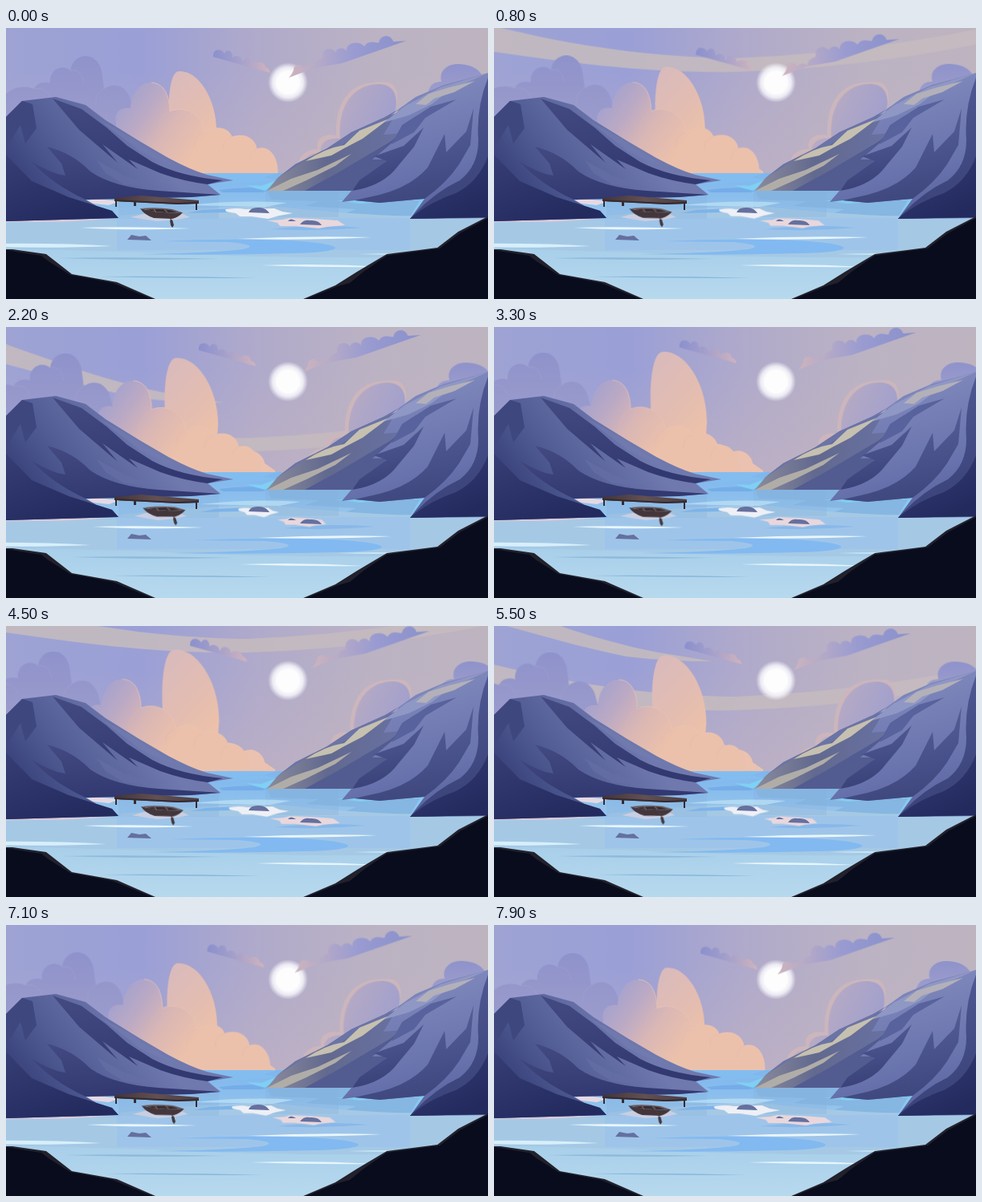
Write an HTML page that moves like this. It is 600 by 338 pixels and loops after 8000 ms.

```html
<!DOCTYPE html>
<html lang="en">
<head>
<meta charset="utf-8">
<title>Lake at dusk</title>
<style>
html,body{margin:0;width:100%;height:100%;overflow:hidden;background:#a5a6d5}
svg{display:block;width:100vw;height:100vh}
@keyframes drift{
  from{transform:none}
  to{transform:translate(var(--x,0px),var(--y,0px)) rotate(var(--r,0deg)) scale(var(--s,1),var(--v,1))}
}
@keyframes fall{from{transform:translateY(-106px)}to{transform:translateY(182px)}}
.cloud{animation:drift 4s linear infinite alternate}
.wave{animation:drift 2s linear infinite alternate}
.wisps{animation:fall 4s linear infinite}
.violet{--x:-46px;--y:-4px}
.tall{--s:1.22;--v:1.22;transform-origin:245px 181px}
.front{--x:-41px;--y:-2px}
.wingL{--x:-33px;--y:-13px}
.wingR{--x:33px;--y:-11px}
.peachR{--x:20px;--y:-1px}
.violetR{--x:18px;--y:-1px}
.tongue{--x:40px;--s:1.1;transform-origin:165px 274px}
.floeA{--s:.56;--v:.9;transform-origin:314px 230px}
.floeB{--s:.58;--v:.9;--x:-6px;transform-origin:374px 243px}
.boat{--x:4px;--y:-1px;--r:-3deg;transform-origin:194px 233px}
.foam{--s:.86;transform-origin:194px 237px}
.left{--x:-30px}
.right{--x:28px}
.small{--x:18px}
</style>
</head>
<body>
<svg viewBox="0 0 600 338" preserveAspectRatio="none">
<defs>
  <linearGradient id="sky"><stop offset="0" stop-color="#9ea3d4"/><stop offset=".28" stop-color="#9a9fd6"/><stop offset=".52" stop-color="#b0aacb"/><stop offset=".76" stop-color="#bbb2c3"/><stop offset="1" stop-color="#beb4c0"/></linearGradient>
  <linearGradient id="dusk" x2="0" y2="1"><stop offset=".3" stop-color="#c8b5bd" stop-opacity="0"/><stop offset="1" stop-color="#c8b5bd" stop-opacity=".4"/></linearGradient>
  <radialGradient id="sun"><stop offset=".55" stop-color="#fdfdfe"/><stop offset=".76" stop-color="#f8f8fc" stop-opacity=".82"/><stop offset="1" stop-color="#f8f8fc" stop-opacity="0"/></radialGradient>
  <linearGradient id="violet" x2="0" y2="1"><stop offset="0" stop-color="#8f93cb"/><stop offset="1" stop-color="#a5a2cd"/></linearGradient>
  <linearGradient id="tall" x2=".5" y2="1"><stop offset="0" stop-color="#d8babe"/><stop offset=".55" stop-color="#e3bdb1"/><stop offset="1" stop-color="#f0c3a8"/></linearGradient>
  <linearGradient id="front" gradientUnits="userSpaceOnUse" x1="150" y1="85" x2="240" y2="150"><stop offset="0" stop-color="#a5a2ce"/><stop offset=".3" stop-color="#bcaac4"/><stop offset=".6" stop-color="#dab7b5"/><stop offset="1" stop-color="#ecc1ab"/></linearGradient>
  <linearGradient id="peach" x2="1" y2=".4"><stop offset="0" stop-color="#cbb3bd"/><stop offset=".5" stop-color="#b3a9c6"/><stop offset="1" stop-color="#a09fcd"/></linearGradient>
  <linearGradient id="wingL"><stop offset="0" stop-color="#8b90cd"/><stop offset=".5" stop-color="#a7a1cb"/><stop offset="1" stop-color="#d0b3bd"/></linearGradient>
  <linearGradient id="wingR"><stop offset="0" stop-color="#cdb4bd"/><stop offset=".3" stop-color="#b0a7ca"/><stop offset=".55" stop-color="#999bd1"/><stop offset="1" stop-color="#8a91cb"/></linearGradient>
  <linearGradient id="water" x2="0" y2="1"><stop offset="0" stop-color="#7db6ee"/><stop offset=".25" stop-color="#90c1ec"/><stop offset=".6" stop-color="#a8cfea"/><stop offset="1" stop-color="#b7d9ee"/></linearGradient>
  <linearGradient id="hillL" gradientUnits="userSpaceOnUse" x1="10" y1="220" x2="150" y2="110"><stop offset="0" stop-color="#303870"/><stop offset=".5" stop-color="#525d96"/><stop offset="1" stop-color="#6f79ae"/></linearGradient>
  <linearGradient id="shade" x2=".4" y2="1"><stop offset="0" stop-color="#434b82"/><stop offset="1" stop-color="#323970"/></linearGradient>
  <linearGradient id="foot" x2=".6" y2="1"><stop offset="0" stop-color="#363e75"/><stop offset="1" stop-color="#232a5e"/></linearGradient>
  <linearGradient id="ridge"><stop offset="0" stop-color="#8a8b9b"/><stop offset=".35" stop-color="#62698f"/><stop offset="1" stop-color="#6b75ab"/></linearGradient>
  <linearGradient id="hillR" gradientUnits="userSpaceOnUse" x1="520" y1="80" x2="560" y2="238"><stop offset="0" stop-color="#7d86ba"/><stop offset=".6" stop-color="#6872ac"/><stop offset="1" stop-color="#565f9c"/></linearGradient>
  <linearGradient id="fold" x2=".2" y2="1"><stop offset="0" stop-color="#535d98"/><stop offset="1" stop-color="#3a4279"/></linearGradient>
  <linearGradient id="deck"><stop offset="0" stop-color="#423438"/><stop offset=".5" stop-color="#625052"/><stop offset="1" stop-color="#4b3c40"/></linearGradient>
</defs>

<rect width="600" height="338" fill="url(#sky)"/>
<rect width="600" height="181" fill="url(#dusk)"/>

<g class="wisps" fill="#c5bbbf" opacity=".9">
  <path d="M0-31C70-6 130 16 200 30L272 42Q215 42 165 36C105 24 55 8 0-6Z"/>
  <path d="M0 46C100 71 200 85 300 86Q450 80 600 50V69Q450 99 300 103C190 105 90 91 0 78Z"/>
</g>

<circle cx="351" cy="68" r="25" fill="url(#sun)"/>

<g class="cloud violet" fill="url(#violet)">
  <path d="M0 181V82Q16 69 35 76C38 68 48 66 55 69C53 52 70 44 80 53C84 28 118 28 120 60L122 76C138 65 153 75 156 94L180 181Z"/>
  <path d="M36 76Q49 73 55 87M80 53Q94 50 97 69M122 76Q110 82 112 96" fill="none" stroke="#a59fce" stroke-width="1" opacity=".65"/>
</g>

<g class="cloud violetR">
  <path d="M526 90V78Q529 67 542 67C538 51 552 44 565 45Q584 46 592 58L610 65V100Z" fill="url(#violet)"/>
</g>

<g class="cloud peachR">
  <path d="M365 181C359 161 374 151 388 151C384 137 398 131 411 134C410 104 419 76 449 69Q464 66 477 68C494 74 488 107 472 126L440 181Z" fill="#ccb6bc"/>
  <path d="M371 181C366 162 377 155 392 156C389 142 402 136 416 138C413 105 426 77 454 71C496 63 490 107 472 127L440 181Z" fill="url(#peach)"/>
</g>

<path d="M215 181V145H270C286 145 293 150 294 157C308 149 321 160 322 170L335 179V181Z" fill="#ebc1af"/>

<g class="cloud tall">
  <path d="M206 150C199 98 203 55 215 54C239 52 262 88 262 128L258 181H206Z" fill="url(#tall)"/>
</g>

<g class="cloud front">
  <path d="M137 181V120C134 105 142 98 155 100C156 78 170 67 181 68C195 69 203 80 204 104C222 96 246 108 247 130C260 121 278 124 281 136C298 130 311 139 312 151C328 145 339 162 338 181Z" fill="url(#front)"/>
  <path d="M181 68C195 69 203 80 204 104C222 96 246 108 247 130C260 121 278 124 281 136C298 130 311 139 312 151C328 145 339 162 338 181" fill="none" stroke="#e8c3b5" stroke-width=".8"/>
  <path d="M204 104Q188 112 188 135M247 130Q235 133 234 148M281 136Q269 139 270 152M312 151Q303 155 304 165" fill="none" stroke="#dfb6ad" opacity=".5"/>
</g>

<g class="cloud wingL">
  <path d="M258 36C257 27 266 24 272 32C274 25 283 28 282 37C286 33 294 35 295 43C297 35 308 36 309 45C314 40 323 43 323 49Q328 50 329 56L297 47Z" fill="url(#wingL)"/>
</g>
<g class="cloud wingR">
  <path d="M352 62Q357 56 358 52C358 45 367 44 371 50C375 44 382 47 383 50C385 38 392 41 394 37C392 25 405 23 410 30C414 23 421 25 424 29C422 18 439 15 446 23C452 13 463 20 464 18C466 8 479 7 482 17L498 16L418 44L383 50Z" fill="url(#wingR)"/>
</g>

<rect y="181" width="600" height="157" fill="url(#water)"/>
<path d="M240 181H340L320 186L336 190L285 194H238Z" fill="#83bdf0"/>
<path d="M265 202Q300 197 335 201L318 205H270Z" fill="#74ade8"/>
<path d="M325 203H432L425 213L515 215L504 234Q450 236 417 233L436 226L372 222L390 216L330 214Z" fill="#86b6e2"/>
<path d="M323 203L338 189L318 197L300 196L311 200Z" fill="#7fd0f3"/>
<path d="M410 215L440 219L524 213L508 230L503 236L516 215Z" fill="#83cdf0"/>
<path d="M0 240H140L143 234Q260 222 330 222Q420 232 503 235H600V284Q370 290 185 280L0 275Z" fill="#a5c9e5"/>
<g fill="#86b0dc" opacity=".3">
  <path d="M140 209H265V238H140Z"/>
  <path d="M323 203H414V236H323Z"/>
</g>
<path d="M138 237H503V277H138Z" fill="#8fbdf0" opacity=".35"/>
<path d="M0 239L138 238L70 242H0Z" fill="#d6c9da"/>

<g class="wave small">
  <path d="M225 221Q295 214 350 218L324 223Z" fill="#c9e9f8" opacity=".6"/>
  <path d="M244 227L285 225L276 230L225 231Z" fill="#7db3ea"/>
  <path d="M330 251Q390 244 443 249Q385 254 330 251Z" fill="#7fb3ea" opacity=".7"/>
</g>
<path class="wave tongue" d="M165 282Q250 281 295 276Q318 271 278 267L195 266Q280 262 352 265Q405 268 410 274Q408 280 356 281Q260 284 165 282Z" fill="#82b9f1"/>
<path class="wave right" d="M288 263Q370 259 455 261Q381 265 288 263Z" fill="#eaf6fc"/>
<path class="wave small" d="M92 249Q153 247 229 250Q152 253 92 249Z" fill="#e8f6fd"/>
<path class="wave left" d="M-20 269Q70 268 132 272Q65 275-20 273Z" fill="#d7effa"/>
<path class="wave left" d="M318 296Q394 293 472 298Q402 299 318 296Z" fill="#e6f5fc"/>
<path class="wave small" d="M66 287Q148 285 265 288Q155 290 66 287Z" fill="#8eb9dc"/>
<path class="wave small" d="M115 310Q218 309 312 312Q206 312 115 310Z" fill="#86b8dc"/>
<path class="wave left" d="M439 282Q485 280 535 282Q490 284 439 282Z" fill="#c7e6f6"/>

<path d="M91 217L112 213L142 216L128 221Z" fill="#e5d9e3"/>
<g class="wave floeA"><path d="M273 226Q288 224 298 226L334 225L344 229L357 231L340 234L326 238L306 235L291 235L286 231L274 229Z" fill="#eef0f6"/></g>
<g class="wave floeB"><path d="M325 240L343 239L353 237L385 238L413 240L422 246L399 248L389 250L360 247L341 247L338 243Z" fill="#e9d7dc"/></g>
<g fill="#65709f">
  <path d="M302 230Q304 224 313 224Q323 223 328 231Z"/>
  <path d="M366 245Q370 239 378 240Q389 239 393 246Z"/>
  <path d="M351 241Q354 236 361 241Z"/>
  <path d="M151 264L156 258L166 260L174 259L181 265Z"/>
</g>

<path d="M0 111L20 91L62 86L99 96L124 115L166 141L202 162Q230 177 250 183L283 190L251 195L267 208L230 211L99 214L113 222L132 228L140 237L0 241Z" fill="url(#hillL)"/>
<path d="M0 111L20 91L33 95L38 125L24 144L18 121L0 150Z" fill="#3f477f"/>
<path d="M58 88L94 101L125 124L151 147L182 167Q216 185 270 190L251 195Q220 191 192 181L153 164L164 176L120 145L139 168L91 127Z" fill="url(#shade)"/>
<path d="M115 114L155 136L178 152L216 174Q181 163 154 146L164 151Z" fill="#727cb1" opacity=".7"/>
<path d="M51 148Q83 156 105 179Q134 199 190 203L267 208L230 211L99 214Q58 195 31 166Q57 182 74 184L69 169Z" fill="url(#shade)"/>
<path d="M0 158L32 191L78 211L132 228L140 237L0 241Z" fill="url(#foot)"/>
<path d="M113 165L147 184L192 199L147 195L124 181Z" fill="#6670a6" opacity=".7"/>

<path d="M325 203L338 187L360 170L400 150L430 130L470 112L508 98L538 139L501 175L430 203Z" fill="url(#ridge)"/>
<path d="M338 187L360 170L400 150L430 130L470 112L489 101L456 127L430 138L412 150L386 157L367 169Z" fill="#6b74a6"/>
<path d="M373 166Q397 150 421 146L440 128L477 113L444 138L421 150L405 159Z" fill="#c6c0b0"/>
<path d="M325 203L355 188L388 177L430 157L410 172L374 190L345 203Z" fill="#b0ada8"/>
<path d="M372 203L414 180L478 142L521 109L468 172L430 203Z" fill="#535c91"/>

<path d="M418 217L430 203Q465 194 485 164L456 164L495 131L470 133L489 101L510 86L545 71L575 63L600 56V237L503 238L521 213L465 218L434 215Z" fill="url(#hillR)"/>
<path d="M470 118L497 97L541 74L600 56L552 78L530 95L501 109Z" fill="#8f97c4"/>
<path d="M510 95L526 82L552 74L584 66L558 80L533 88L523 96Z" fill="#b3b0b9"/>
<path d="M520 124L495 147L458 160L474 166L440 190L431 203Q470 197 488 172L508 148Z" fill="url(#fold)"/>
<path d="M493 121L529 98L561 89L522 112L508 130L480 145Z" fill="#58629c"/>
<path d="M546 132L525 174Q504 198 465 208L434 215L465 218L521 213Q549 193 564 170L578 146L582 100L573 129L548 155Z" fill="url(#fold)" opacity=".85"/>
<path d="M600 62Q585 100 588 140Q588 172 565 190Q531 206 503 238L600 236Z" fill="url(#fold)"/>
<path d="M600 160Q588 192 560 206Q525 218 503 238L600 236Z" fill="url(#foot)"/>

<g class="wave foam"><path d="M155 236L171 232L218 231L229 236L213 239L188 241Z" fill="#d9d2e0" opacity=".75"/></g>
<path d="M136 214H138V223H136ZM159 215H162V222H159ZM236 218H238V227H236Z" fill="#352b32"/>
<path d="M135 212L168 209L240 215V219L214 220L135 216Z" fill="url(#deck)"/>
<path d="M135 214L214 218L240 217V219L214 220L135 216Z" fill="#352a30"/>

<g class="wave boat">
  <path d="M167 225Q192 232 220 230Q215 236 207 238L184 237Q172 233 167 225Z" fill="#43363b"/>
  <path d="M168 225Q187 223 207 226L219 230Q192 232 168 225Z" fill="#695758"/>
  <path d="M174 227Q188 225 204 227L213 230Q193 231 174 227Z" fill="#362c33"/>
  <path d="M184 226L187 230M197 226L201 230" stroke="#75605c" stroke-width="1.4"/>
  <path d="M201 229L206 241" stroke="#4a3b3d" stroke-width="1.1"/>
  <path d="M204 240L207 239L209 246L207 249L205 246Z" fill="#43373d"/>
</g>

<path d="M0 276L8 276L50 282L82 307L138 317L186 338H0Z" fill="#22212b"/>
<path d="M0 277L44 284L53 291L80 308L133 318L182 338H0Z" fill="#090c1d"/>
<path d="M370 338L410 321L437 304L474 282L537 274L563 254L600 235V338Z" fill="#22212b"/>
<path d="M374 338L413 322L428 318L445 304L474 284L540 275L565 256L600 237V338Z" fill="#090c1d"/>
</svg>
</body>
</html>
```
